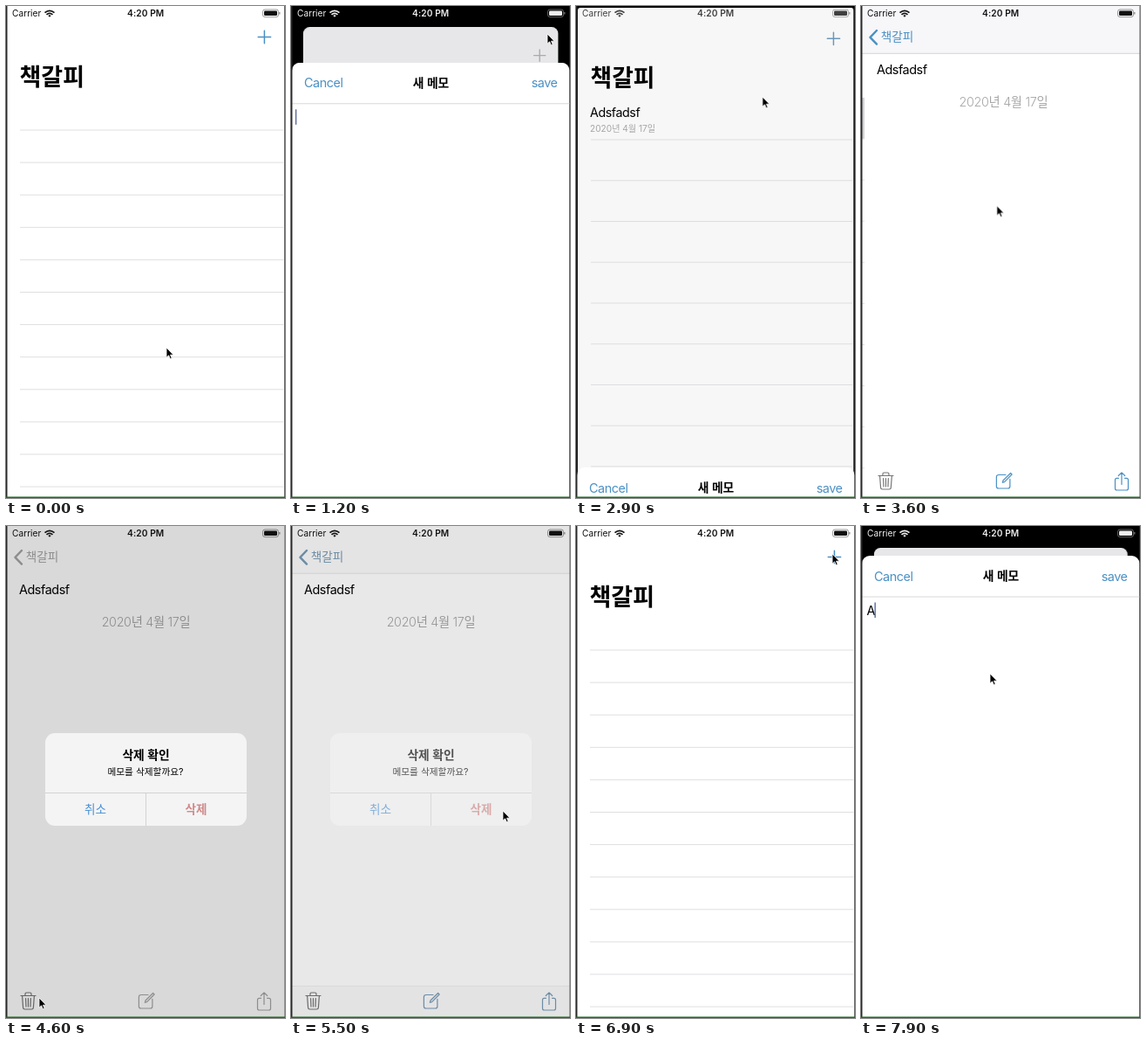
Write an HTML page that moves like this. It is 320 px wide and 563 px high and loops after 8000 ms.

```html
<!DOCTYPE html>
<html lang="ko">
<head>
<meta charset="utf-8">
<title>Memo app</title>
<style>
  html, body { margin: 0; width: 100%; height: 100%; overflow: hidden; background: #000; }
  svg { display: block; width: 100vw; height: 100vh; }
  text { font-family: Inter, 'Noto Sans CJK KR', 'Noto Sans CJK', sans-serif; font-size: 14.4px; fill: currentColor; }
  .latin { letter-spacing: -.45px; }
  .mid { text-anchor: middle; }
  .bold { font-weight: 600; }
  .ko { font-size: 13.6px; }
  .date { font-weight: 300; font-size: 14.3px; letter-spacing: -.3px; }
  .icon { fill: none; stroke: currentColor; stroke-width: 1.2; stroke-linejoin: round; stroke-linecap: round; }
  .blue { color: #4a90c4; }
  .a { animation: 8s linear infinite; }

  .status { animation-name: status; }
  .page { animation-name: page; transform-origin: 160px 0; }
  .paper { animation-name: paper; }
  .plus { animation-name: plus; }
  .head { animation-name: head; }
  .bare { animation-name: bare; animation-timing-function: step-end; }
  .filled { animation-name: filled; animation-timing-function: step-end; }
  .picked { animation-name: picked; }
  .push { animation-name: push; }
  .detail { animation-name: detail; }
  .nav { animation-name: nav; }
  .bar { animation-name: bar; }
  .tool { animation-name: tool; }
  .tint { animation-name: tint; }
  .dim { animation-name: dim; }
  .alert { animation-name: alert; transform-origin: 160px 290px; }
  .sheet { animation-name: sheet; }
  .mouse { animation-name: mouse; }

  /* 1% = 80 ms */
  @keyframes status {
    0%, 12.25%, 37.5%, 88%, 100% { color: #111; }
    15%, 33%, 90.5%, 99.99% { color: #eee; }
    36.5% { color: #333; }
  }
  @keyframes sheet {
    0%, 12.25% { transform: translateY(540px); animation-timing-function: cubic-bezier(.25,.6,.5,.95); }
    15% { transform: translateY(31px); animation-timing-function: ease-out; }
    18%, 32.5% { transform: none; animation-timing-function: cubic-bezier(.35,.2,.3,1); }
    38.2%, 88% { transform: translateY(540px); animation-timing-function: cubic-bezier(.25,.6,.5,.95); }
    90.5% { transform: translateY(31px); animation-timing-function: ease-out; }
    93.6%, 100% { transform: none; }
  }
  @keyframes page {
    0%, 12.25% { transform: none; animation-timing-function: cubic-bezier(.25,.6,.5,.95); }
    15% { transform: translateY(24px) scale(.918); animation-timing-function: ease-out; }
    18%, 32.5% { transform: translateY(25px) scale(.913); animation-timing-function: cubic-bezier(.35,.2,.3,1); }
    38.2%, 88% { transform: none; animation-timing-function: cubic-bezier(.25,.6,.5,.95); }
    90.5% { transform: translateY(24px) scale(.918); animation-timing-function: ease-out; }
    93.6%, 100% { transform: translateY(25px) scale(.913); }
  }
  @keyframes paper {
    0%, 12.25%, 38.2%, 88% { fill: #fff; rx: 0px; }
    15%, 32.5%, 90.5%, 100% { fill: #e7e6e8; rx: 8px; }
  }
  @keyframes plus {
    0%, 12%, 38.2%, 87.8% { color: #4a90c4; }
    14.5%, 32.5%, 90%, 100% { color: #aaa; }
  }
  @keyframes bare {
    0%, 72.1%, 100% { visibility: visible; }
    33.75% { visibility: hidden; }
  }
  @keyframes filled {
    0%, 72.1%, 100% { visibility: hidden; }
    33.75% { visibility: visible; }
  }
  @keyframes picked {
    0%, 40.2% { opacity: 0; }
    40.7%, 100% { opacity: 1; }
  }
  @keyframes push {
    0%, 40.3% { transform: none; animation-timing-function: cubic-bezier(.3,.5,.5,.95); }
    45% { transform: translateX(-105px); }
    46.2%, 72.3% { transform: translateX(-106px); animation-timing-function: cubic-bezier(.3,.4,.3,1); }
    78%, 100% { transform: none; }
  }
  @keyframes detail {
    0%, 40.3% { transform: translateX(322px); animation-timing-function: cubic-bezier(.3,.5,.5,.95); }
    45% { transform: translateX(3px); }
    46.2%, 72.3% { transform: none; animation-timing-function: cubic-bezier(.3,.4,.3,1); }
    78%, 100% { transform: translateX(322px); }
  }
  @keyframes head {
    0%, 40.3%, 77.5%, 100% { opacity: 1; }
    43.5%, 73% { opacity: 0; }
  }
  @keyframes nav {
    0%, 40.8%, 76.5%, 100% { opacity: 0; }
    44.8%, 72.3% { opacity: 1; }
  }
  @keyframes bar {
    0%, 55%, 70%, 100% { opacity: 1; }
    57.2%, 67% { opacity: 0; }
  }
  @keyframes tool {
    0%, 45.2%, 57.2%, 67%, 100% { opacity: 0; }
    46.6%, 55%, 70%, 78% { opacity: 1; }
  }
  @keyframes tint {
    0%, 54.4%, 70.5%, 100% { color: #4a90c4; }
    57%, 67% { color: #a5a5a5; }
  }
  @keyframes dim {
    0%, 54.3%, 72%, 100% { opacity: 0; }
    57.4%, 67% { opacity: .15; }
    71.25% { opacity: .01; }
  }
  @keyframes alert {
    0%, 54.3% { opacity: 0; transform: scale(1.16); animation-timing-function: ease-out; }
    57.4%, 67% { opacity: 1; transform: none; }
    71.25% { opacity: .14; transform: none; }
    72.2%, 100% { opacity: 0; transform: none; }
  }
  @keyframes mouse {
    0% { transform: translate(184px,391px); animation-timing-function: ease-in-out; }
    11.3%, 23.5% { transform: translate(294px,32px); animation-timing-function: ease-in-out; }
    28.7%, 33.2% { transform: translate(298px,58px); animation-timing-function: ease-in-out; }
    38.7%, 41% { transform: translate(157px,135px); animation-timing-function: ease-in; }
    45% { transform: translate(156px,228px); }
    51.25% { transform: translate(46px,540px); animation-timing-function: ease-out; }
    52.5%, 59% { transform: translate(38px,540px); animation-timing-function: ease-in-out; }
    65.5%, 72% { transform: translate(243px,326px); animation-timing-function: ease-in-out; }
    86%, 89.5% { transform: translate(294px,32px); animation-timing-function: ease-in-out; }
    97%, 100% { transform: translate(148px,169px); }
  }
</style>
</head>
<body>
<svg viewBox="0 0 320 563" preserveAspectRatio="none">
  <rect width="320" height="563"/>

  <!-- memo list -->
  <g class="a page">
    <g class="a push">
      <rect class="a paper" x="1" width="318.5" height="600" fill="#fff"/>
      <path class="a bare" id="bareLines" stroke="#dcdcde" stroke-width=".9"/>
      <g class="a filled">
        <rect class="a picked" x="1" y="105" width="319" height="47" fill="#d3d3d6"/>
        <path id="rowLines" stroke="#dcdcde" stroke-width=".9"/>
        <text class="latin" x="15" y="126">Adsfadsf</text>
        <text x="15" y="143" style="font-size:10.2px;color:#a5a5a8">2020년 4월 17일</text>
      </g>
      <g class="a head">
        <text x="15.5" y="91" style="font-size:27px;font-weight:700">책갈피</text>
        <path class="a icon plus" d="M289.2 35.5h14.4M296.4 28.3v14.4" style="stroke-width:1.5"/>
      </g>
    </g>
  </g>

  <!-- memo detail -->
  <g class="a detail">
    <rect x="1" width="319" height="563" fill="#fff"/>
    <g class="a tool">
      <rect x="1" y="526" width="319" height="37" fill="#f6f5f8"/>
      <path d="M1 526.5H320" stroke="#e2e1e5"/>
    </g>
    <text class="latin" x="15" y="77.6">Adsfadsf</text>
    <text class="mid date" x="160.5" y="115" color="#a6a6a8">2020년 4월 17일</text>
    <path class="icon" color="#777" d="M17 537.5H34M22 537v-1.6q0-1.4 1.4-1.4h4.2q1.4 0 1.4 1.4v1.6M18.6 537.5l1 13.6q.1 1.9 2 1.9h7.8q1.9 0 2-1.9l1-13.6M22.6 540.5l.4 9.5M25.5 540.5v9.5M28.4 540.5l-.4 9.5"/>
    <g class="a tint">
      <path class="icon" d="M163 536.5h-8q-2.6 0-2.6 2.6v10.3q0 2.6 2.6 2.6h10.300q2.600 0 2.600-2.600v-8M159.300 545.300l.7-2.300 8.600-8.500 1.500 1.500-8.500 8.600z"/>
      <path class="icon" d="M292.500 540.300h-2q-2 0-2 2v9.700q0 2 2 2h11q2 0 2-2v-9.700q0-2-2-2h-2M296 547.500V534M292.300 537.500l3.700-3.700 3.700 3.700"/>
    </g>
  </g>
  <g class="a nav">
    <g class="a bar">
      <rect x="1" width="319" height="54" fill="#f7f6f9"/>
      <path d="M1 54.300H320" stroke="#cfcfd3" stroke-width=".9"/>
    </g>
    <g class="a tint">
      <path class="icon" d="M18 28l-7.500 7.800 7.500 7.800" style="stroke-width:2.400"/>
      <text class="ko" x="22.800" y="40.300">책갈피</text>
    </g>
  </g>

  <!-- new memo -->
  <g class="a sheet">
    <rect x="1" y="34" width="318.500" height="600" rx="9" fill="#fff"/>
    <path d="M1 81H320" stroke="#d4d4d6" stroke-width=".9"/>
    <g class="blue">
      <text class="latin" x="15" y="62.600">Cancel</text>
      <text class="latin" x="305.500" y="62.600" text-anchor="end">save</text>
    </g>
    <text class="mid bold" x="160.500" y="62.400" style="font-size:13.800px">새 메모</text>
    <text class="latin" id="memo" x="6.500" y="101.800"></text>
    <rect id="caret" x="5" y="87.500" width="1.400" height="17.500" fill="#5a6a9c"/>
  </g>

  <rect class="a dim" width="320" height="563" opacity="0"/>

  <g class="a status">
    <text x="7" y="12.400" style="font-size:10.200px">Carrier</text>
    <text class="mid bold" x="160.200" y="12.400" style="font-size:10.200px;letter-spacing:.1px">4:20 PM</text>
    <g fill="none" stroke="currentColor" stroke-width="1.700">
      <path d="M44.500 7.700q5.500-4.800 11 0M46.500 9.900q3.500-3 7 0"/>
      <path d="M50 12.800l-1.700-1.800q1.700-1.300 3.400 0z" fill="currentColor" stroke="none"/>
      <rect x="294.500" y="4" width="18" height="8.600" rx="2.500" stroke-width=".8" opacity=".5"/>
      <rect x="296" y="5.500" width="15" height="5.600" rx="1.300" fill="currentColor" stroke="none"/>
      <path d="M313.800 7v2.600" stroke-width="1.200" opacity=".5"/>
    </g>
  </g>

  <g class="a alert" opacity="0">
    <rect x="45" y="237" width="231" height="106" rx="11" fill="#f4f4f4"/>
    <path d="M45 305.500H276M160.500 305.500V343" stroke="#cfcfd1" stroke-width=".9"/>
    <text class="mid bold" x="160.500" y="267" style="font-size:13.800px">삭제 확인</text>
    <text class="mid" x="160" y="284.500" style="font-size:10.700px">메모를 삭제할까요?</text>
    <text class="mid ko" x="102.500" y="329" color="#4a90d4">취소</text>
    <text class="mid ko bold" x="218" y="329" color="#d08a8a">삭제</text>
  </g>

  <path d="M.75 0V563" stroke="#262626" stroke-width="1.500"/>
  <path d="M319.700 0V563" stroke="#444" stroke-width=".6"/>
  <path d="M0 562.300H320" stroke="#1c6a1c" stroke-width="1.400"/>

  <g class="a mouse">
    <path d="M0 0V11.200L2.600 8.800 4.400 12.800 6.200 12 4.500 8.200H8Z" fill="#000" stroke="#fff" stroke-width=".8"/>
  </g>
</svg>
<script>
  const $ = id => document.getElementById(id);
  const lines = (y, gap) => {
    let d = '';
    for (; y < 562; y += gap) d += `M16 ${y}H318.500`;
    return d;
  };
  $('bareLines').setAttribute('d', lines(142, 37.1));
  $('rowLines').setAttribute('d', lines(152, 47.1));

  const word = 'Adsfadsf', memo = $('memo'), caret = $('caret');
  const clock = document.querySelector('.sheet').getAnimations()[0];

  function typed(t) {
    if (t > 5000) return t >= 7750 ? 1 : 0;
    return Math.max(0, Math.min(word.length, Math.floor((t - 1400) / 100)));
  }
  function tick() {
    const n = typed((clock.currentTime || 0) % 8000);
    if (memo.textContent.length !== n) {
      memo.textContent = word.slice(0, n);
      caret.setAttribute('x', n ? 6 + memo.getComputedTextLength() : 5);
    }
    requestAnimationFrame(tick);
  }
  tick();
</script>
</body>
</html>
```
